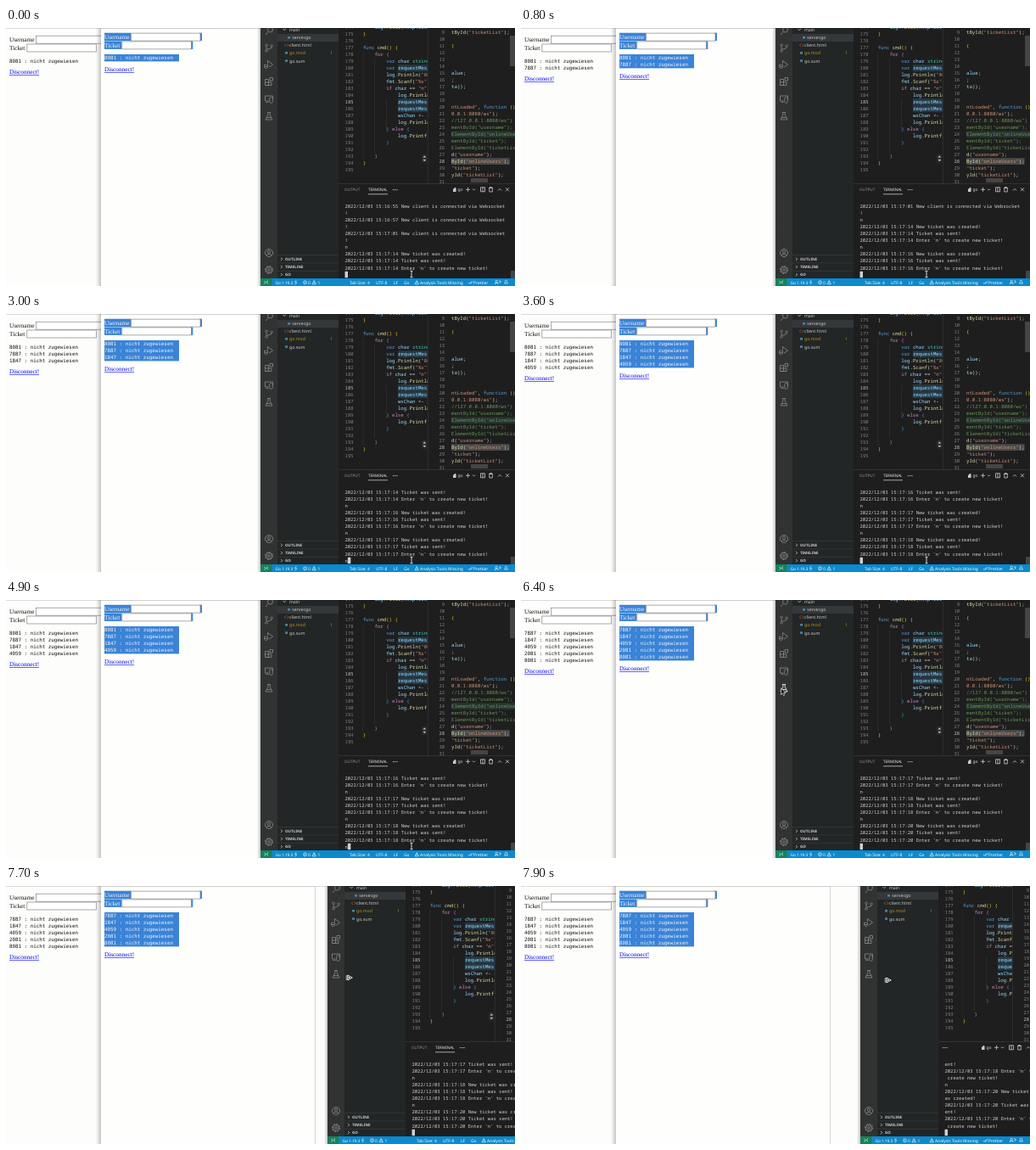
Write an HTML page that moves like this. It is 600 px wide and 304 px high and loops after 8000 ms.

```html
<!DOCTYPE html>
<html lang="en">
<head>
<meta charset="utf-8">
<title>Ticket queue</title>
<style>
html, body { margin: 0; width: 100%; height: 100%; overflow: hidden; background: #fdfdfb; }
svg { display: block; }
text { white-space: pre; text-rendering: geometricPrecision; }
.serif { font-family: "Liberation Serif", serif; }
.pre { font-family: "DejaVu Sans Mono", monospace; }
.mono { font-family: "Noto Sans Mono", monospace; }
.ui { font-family: "Noto Sans", sans-serif; }
</style>
</head>
<body>
<svg id="stage" width="600" height="304" viewBox="0 0 600 304"></svg>
<script>
const LOOP = 8000, STEP = 100;
const BLUE = '#3a83d6', GREY = '#8a8a8a', LIGHT = '#cccccc';
const CODE_SIZE = 5.72, CODE_CHAR = 3.43, CODE_LINE = 7.98;

const esc = s => s.replace(/&/g, '&amp;').replace(/</g, '&lt;');
const rect = (x, y, w, h, fill, more = '') =>
  `<rect x="${x}" y="${y}" width="${w}" height="${h}" fill="${fill}" ${more}/>`;
const text = (x, y, s, size, fill, font, more = '') =>
  `<text x="${x}" y="${y}" font-size="${size}" fill="${fill}" class="${font}" ${more}>${esc(s)}</text>`;
const ui = (x, y, s, fill = LIGHT, size = 5.2, more = '') => text(x, y, s, size, fill, 'ui', more);
const path = (d, stroke = LIGHT, w = .8, fill = 'none') =>
  `<path d="${d}" stroke="${stroke}" stroke-width="${w}" fill="${fill}"/>`;
const ring = (x, y, r, stroke, w = 1) =>
  `<circle cx="${x}" cy="${y}" r="${r}" fill="none" stroke="${stroke}" stroke-width="${w}"/>`;
const group = (x, y, body) => `<g transform="translate(${x} ${y})">${body}</g>`;

// Each round: key typed, return pressed, second shown in the log
const rounds = [[100, 700, 16], [1500, 2100, 17], [2900, 3400, 18], [4900, 5100, 20]];
const lists = ['8081', '8081 7887', '8081 7887 1847', '8081 7887 1847 4059', '7887 1847 4059 2081 8081'];

const pointerPath = [[0, 478, 290], [5400, 478, 290], [6000, 345, 150], [6400, 309, 108],
  [7000, 302, 101], [7600, 302, 101], [7700, 404, 108], [7900, 432, 111], [8000, 432, 111]];

function pointerAt(t) {
  const i = pointerPath.findIndex(p => p[0] > t);
  const [a, b] = [pointerPath[i - 1], pointerPath[i]];
  const k = (t - a[0]) / (b[0] - a[0]);
  return [a[1] + (b[1] - a[1]) * k, a[2] + (b[2] - a[2]) * k];
}

function page(x, y, tickets, selected) {
  const ink = selected ? '#f2f6ff' : '#111';
  let out = '';
  [['Username', 31, 30], ['Ticket', 20.3, 20]].forEach(([label, gap], i) => {
    const top = y + i * 9.8;
    if (selected) out += rect(x, top - 7, gap, 9.4, BLUE) + rect(x + gap + 81, top - 7, 3, 9.4, BLUE);
    out += text(x, top, label, 7.28, ink, 'serif') +
      rect(x + gap + .5, top - 6.6, 81.5, 9, '#fff', 'stroke="#858585" stroke-width=".7"');
  });
  if (selected) out += rect(x, y + 18.3, 88, tickets.length * 8 + .4, BLUE);
  tickets.forEach((n, i) => {
    out += text(x, y + 24.7 + i * 8, n + ' : nicht zugewiesen', 5.85, ink, 'pre');
  });
  const end = y + 30.6 + tickets.length * 8;
  return out + text(x, end, 'Disconnect!', 7.28, '#0000ee', 'serif') +
    rect(x, end + .8, 35, .6, '#0000ee');
}

function paint(token, next, depth) {
  if (token[0] === '"') return '#ce9178';
  if (/^(func|var|function)$/.test(token)) return '#569cd6';
  if (/^(for|if|else)$/.test(token)) return '#c586c0';
  if (token === 'string') return '#4ec9b0';
  if (/[{}]/.test(token)) return ['#e8c81a', '#d070cc', '#2f9fe8'][depth % 3];
  if (!/^\w/.test(token)) return '#d4d4d4';
  return next && next[0] === '(' ? '#dcdcaa' : '#9cdcfe';
}

function code(x, y, line, comment) {
  if (comment) return text(x, y, line, CODE_SIZE, '#6a9955', 'mono');
  const depth = line.search(/\S/) / 4;
  const open = (line.match(/^[^"(]*"(?=[,)])/) || [''])[0];
  const tokens = line.slice(open.length).match(/"[^"]*"?|\w+|[^\w"]+/g) || [];
  const spans = tokens.map((s, i) => `<tspan fill="${paint(s, tokens[i + 1], depth)}">${esc(s)}</tspan>`);
  return `<text x="${x}" y="${y}" font-size="${CODE_SIZE}" class="mono">` +
    `<tspan fill="#ce9178">${esc(open)}</tspan>${spans.join('')}</text>`;
}

const lineNumber = (x, y, n, active) =>
  text(x, y, '' + n, 5.5, active ? '#c6c6c6' : '#858585', 'mono', 'text-anchor="end"');

const mainCode = `    log.Fatal(http.ListenAndServe
}

func cmd() {
    for {
        var char string
        var requestMessage
        log.Println("8081 ready")
        fmt.Scanf("%s", &char)
        if char == "n" {
            log.Println("New")
            requestMessage
            requestMessage
            wsChan <- requestMessage
            log.Println("Sent")
        } else {
            log.Printf("Enter")
        }

    }
}
`.split('\n');

const sideCode = { 9: 'tById("ticketList");', 11: '{', 15: 'alue;', 16: ';', 17: 'ta));',
  20: 'ntLoaded", function () {', 21: '0.0.1:8080/ws");', 22: '//127.0.0.1:8080/ws")',
  23: 'mentById("username");', 24: 'ElementById("onlineUsers");', 25: 'mentById("ticket");',
  26: 'ElementById("ticketList");', 27: 'd("username");', 28: 'ById("onlineUsers");',
  29: '"ticket");', 30: 'yId("ticketList");' };

function mainEditor() {
  const left = 420.7;
  let out = rect(392, 0, 208, 184, '#1e1e1e');
  for (const [level, from, to] of [[0, 28, 155], [1, 36, 147], [2, 84, 123]])
    out += rect(left + level * 4 * CODE_CHAR, from, .4, to - from, '#404040');
  mainCode.forEach((line, i) => {
    const n = 174 + i, y = 1.35 + i * CODE_LINE;
    if (/requestMessage$/.test(line) && !line.includes('<'))
      out += rect(left + line.search('requ') * CODE_CHAR, y - 5.8, 47, 7.8, '#253a48');
    out += lineNumber(409.5, y, n, n === 185) + code(left, y, line);
  });
  return out + rect(490.5, 149, 5.5, 9.5, '#2e2e2e') +
    path('M491.5 152.5l1.8-2 1.8 2zM491.5 155l1.8 2 1.8-2z', 'none', 0, '#ccc');
}

function sideEditor() {
  let out = rect(497, 0, 203, 184, '#1e1e1e') + rect(497, 0, .5, 184, '#3a3a3a');
  for (let n = 8; n < 32; n++) {
    const y = 159 + (n - 28) * CODE_LINE, line = sideCode[n] || '';
    if (n === 24 || n === 28)
      out += rect(525, y - 5.8, line.length * CODE_CHAR, 7.8, n === 24 ? '#26342f' : '#484b49');
    out += lineNumber(517, y, n, n === 28) + code(525, y, line, n > 21 && n < 27);
  }
  return out + rect(594, 9, 6, 36, '#454545') + rect(548, 177, 20, 5, '#454545');
}

function activityBar(hot) {
  const icons = [
    [3, 'M-4 5L-1 1.5M-1.5-1a3 3 0 1 0 6 0a3 3 0 1 0-6 0'],
    [22, 'M-3-3a1.3 1.3 0 1 0 .1 0M-3 0V3.5M-3 3.6a1.3 1.3 0 1 0 .1 0M3-2a1.3 1.3 0 1 0 .1 0M3 .8C3 3-1 2-2.6 3.5'],
    [43, 'M-1.5-1V-4.5L4.5 0L0 3.2M-3.5 0a2 2.3 0 1 0 .1 0M-5 1l-1-1M-2 1l1-1M-5.5 2.5h4'],
    [63, 'M-4.5-2.5h4v7h-4zM-4.5 1h7.5v3.5h-7M1-4.5h3.5v3.5h-3.5z'],
    [83.5, 'M-4.5-3.5h9v4M-4.5-3.5v6h4M-3.5 4h3M1 1.5a2 2 0 1 0 3 0a2 2 0 1 0-3 0'],
    [104, 'M-2-4.5h4M-1.2-4.5v3L-4 4h8L1.2-1.5v-3M-2.8 1.5h5.6'],
    [265, 'M-4.5 0a4.5 4.5 0 1 0 9 0a4.5 4.5 0 1 0-9 0M-1.6-1.2a1.6 1.6 0 1 0 3.2 0a1.6 1.6 0 1 0-3.2 0M-3 3c.8-2 5.2-2 6 0'],
  ];
  let out = rect(300, 0, 20, 295, '#313333');
  for (const [y, d] of icons)
    out += group(310, y, path(d, hot && y === 104 ? '#fff' : GREY, .8));
  return out + group(310, 285, ring(0, 0, 3.6, GREY, .9) + ring(0, 0, 1.4, GREY, .8) +
    `<circle r="4.5" fill="none" stroke="${GREY}" stroke-dasharray="1.6 1.93"/>`);
}

function sideBar() {
  const mark = (x, y) => rect(x, y, 3, 2.6, '#3f86a3');
  let out = rect(320, 0, 72, 295, '#232626') + rect(320, 7, 72, 9, '#35383b') +
    path('M326.5 1l1.7 1.7 1.7-1.7') + ui(334, 4, 'main') +
    mark(332, 10) + ui(337.3, 13, 'server.go') +
    path('M330 18.5l-1.6 1.7 1.6 1.7M331.5 18.5l1.6 1.7-1.6 1.7', '#b8602c', .7) + ui(334, 22.2, 'client.html') +
    mark(329, 28) + ui(334, 31.2, 'go.mod', '#b3931c') + ui(382, 31.2, '1', '#b3931c', 5) +
    mark(329, 37.3) + ui(334, 40.5, 'go.sum');
  ['OUTLINE', 'TIMELINE', 'GO'].forEach((s, i) => {
    const y = 272.3 + i * 9.2;
    out += rect(320, y - 4.8, 72, .5, '#444') + path(`M324 ${y - 1.7}l1.7 1.7-1.7 1.7`) +
      ui(329, y + 1.7, s, LIGHT, 4.5, 'font-weight="700"');
  });
  return out;
}

function terminalRows(t, cols) {
  const log = [];
  const say = (time, s) => log.push(`2022/12/03 15:${time} ${s}`);
  const created = sec => {
    log.push('n');
    say('17:' + sec, 'New ticket was created!');
    say('17:' + sec, 'Ticket was sent!');
    say('17:' + sec, "Enter 'n' to create new ticket!");
  };
  for (const time of ['16:55', '16:57', '17:01']) say(time, 'New client is connected via Websocket!');
  created(14);
  let typed = '';
  for (const [key, enter, sec] of rounds) {
    if (t >= enter) created(sec);
    else if (t >= key) typed = 'n';
  }
  log.push(typed);
  const rows = [];
  for (const line of log)
    for (let i = 0; i === 0 || i < line.length; i += cols) rows.push(line.slice(i, i + cols));
  return rows.slice(-11);
}

function panel(t, shift, narrow) {
  let out = rect(392, 184, 208, 111, '#1e1e1e') + rect(392, 183.5, 208, .5, '#444') +
    rect(595, 286, 5, 9, '#454545');
  const dots = narrow ? 397 : 456;
  if (!narrow) out += ui(399, 192, 'OUTPUT', '#999', 4.6) + ui(427, 192, 'TERMINAL', '#eee', 4.6) +
    rect(427, 195.5, 23, .7, '#ddd');
  for (let i = 0; i < 3; i++) out += rect(dots + i * 2.2, 190, 1.1, 1.1, LIGHT);
  const tools = path('M527 193v-3l2.5-2.3 1 1v4.3z', 'none', 0, LIGHT) + ui(532.5, 192.3, 'go', LIGHT, 5) +
    path('M542 190.3h5M544.5 187.8v5M550 189.6l1.5 1.5 1.5-1.5') +
    path('M559.5 187.8h5v5h-5zM562 187.8v5M569 188.5h5M570.5 188.5v-1h2v1M569.8 188.5v4.5h3.5v-4.5') +
    path('M580 191.5l2-2 2 2M589 188.3l4 4M593 188.3l-4 4');
  out += group(narrow ? 16 - shift : 0, 0, tools);
  terminalRows(t, narrow ? 32 : 57).forEach((row, i) => {
    const y = 211.6 + i * 8.1;
    out += text(399.5, y, row, 5.53, '#d0d0d0', 'mono');
    if (i === 10) out += rect(399.5 + row.length * 3.32, y - 5.8, 3.5, 7.4, '#d0d0d0');
  });
  return out;
}

function statusBar(shift, narrow) {
  const label = (x, s) => ui(x, 301.8, s, '#fff', 4.9);
  const warn = x => path(`M${x} 301.8l2.2-4.2 2.2 4.2zM${x + 2.2} 299v1.5`, '#fff', .6);
  let out = rect(300, 295, 300, 9, '#0a8ad0') + rect(300, 295, 13.5, 9, '#16825d') +
    path('M304.5 298l1.8 1.8-1.8 1.8M309 297.5l-1.8 1.8 1.8 1.8', '#fff', .7) +
    ui(317.5, 301.8, 'Go 1.19.3', '#fff', 4.7) + path('M342.3 297l-2 2.8h2.5l-2 2.6', '#fff', .6) +
    ring(352.5, 299.8, 2, '#fff', .6) + path('M351.7 299l1.6 1.6M353.3 299l-1.6 1.6', '#fff', .5) +
    label(356, '0') + warn(361) + label(367.5, '1');
  if (!narrow) out += label(405, 'Tab Size: 4') + label(436, 'UTF-8') + label(457, 'LF') + label(469, 'Go');
  const right = warn(482) + label(488, 'Analysis Tools Missing') +
    path('M545 300l1.2 1.4 2.6-3M547.3 301l.5.4 2.6-3', '#fff', .6) + label(551, 'Prettier') +
    path('M576.5 302v-1.5h3.5v1.5M577 298.5a1.2 1.2 0 1 0 2.4 0a1.2 1.2 0 1 0-2.4 0M581 298h2v2h-1.5', '#fff', .6) +
    path('M587.5 301h4l-.8-1v-1.5a1.2 1.2 0 0 0-2.4 0v1.5z', '#fff', .6);
  return out + group(narrow ? -shift : 0, 0, right);
}

function pointer(t, x, y) {
  if (t >= 6900) return group(x, y,
    path('M-2.3-3v6M-.3-2v4l3.4-2z', '#fff', 1.8, '#fff') + path('M-2.3-3v6M-.3-1.9v3.8l3.2-1.9z', '#222', .7));
  if (x < 391) return group(x, y,
    path('M-2.5-4v7.5l1.8-1.6 1.2 2.6 1.3-.6-1.2-2.5h2.4z', '#fff', .6, '#111'));
  return group(x, y, path('M-1.5-3.7h3M0-3.7v7.4M-1.5 3.7h3', '#eee', .9));
}

function scene(t) {
  const narrow = t >= 7900;
  const shift = t < 7700 ? 0 : t < 7800 ? 79 : narrow ? 100 : 91;
  const tickets = lists[rounds.filter(r => t >= r[1]).length].split(' ');
  const [px, py] = pointerAt(t);
  const hot = px < 320 && py > 96 && py < 116 && t < 6900;
  const shade = (x, w) => rect(x - w, 0, w, 304, 'url(#shade)');
  return `<defs><linearGradient id="shade"><stop offset="0" stop-opacity="0"/>` +
    `<stop offset="1" stop-opacity=".22"/></linearGradient></defs>` +
    rect(0, 0, 600, 304, '#fdfdfb') + rect(0, 0, 600, .7, '#ccc') +
    page(4, 15.8, tickets, false) +
    shade(112, 6) + rect(112, 0, 252, 304, '#fefefc') + rect(112, 0, 252, .7, '#bbb') +
    rect(364, 0, .7, 304, '#c4c4c4') +
    page(116, 12.7, tickets, true) +
    group(shift, 0, shade(300, 4) + mainEditor() + group(Math.min(shift, 82) - shift, 0, sideEditor()) +
      panel(t, shift, narrow) + activityBar(hot) + sideBar() + statusBar(shift, narrow)) +
    pointer(t, px, py);
}

const stage = document.getElementById('stage');
let shown = -1;
function frame() {
  const t = Math.floor(performance.now() % LOOP / STEP) * STEP;
  if (t !== shown) stage.innerHTML = scene(shown = t);
  requestAnimationFrame(frame);
}
frame();
</script>
</body>
</html>
```
